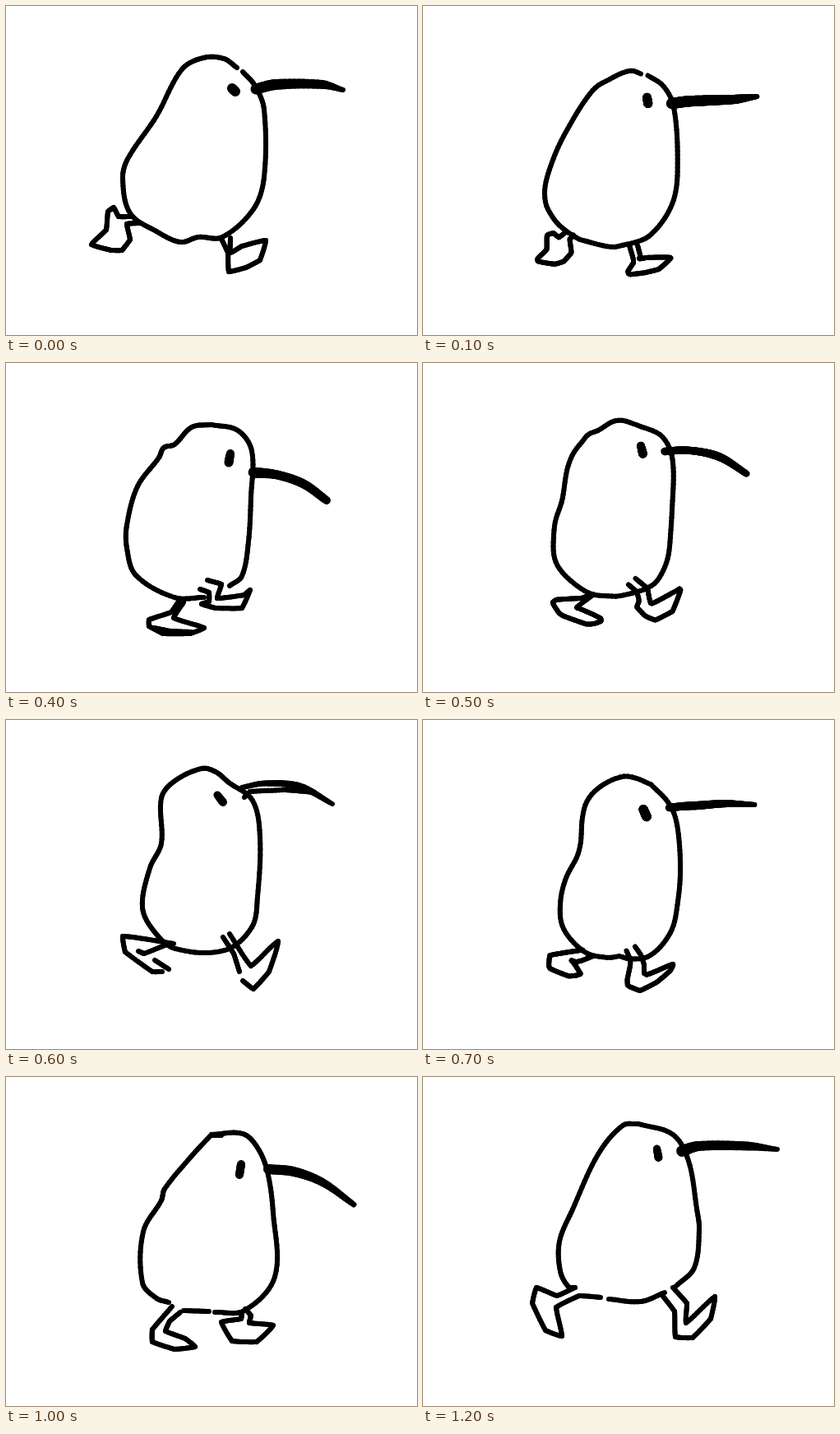
Write an HTML page with a canvas that moves like this. It is 500 px wide and 400 px high and loops after 1300 ms.

```html
<!DOCTYPE html>
<html>
<head>
<meta charset="utf-8">
<title>Running bird</title>
<style>
html, body { margin: 0; overflow: hidden; background: #fff; }
canvas { display: block; }
</style>
</head>
<body>
<canvas id="stage" width="500" height="400"></canvas>
<script>
const ctx = document.getElementById('stage').getContext('2d');
const STEP = 100, LOOP = 1300, PEN = 6;
const CURVE = { body: 1, beak: 1, eye: 1, a: 0.4, b: 0.4, mark: 0.4 };

// Key points "x,y" or "x,y,width"; a slash lifts the pen.
// Legs a and b swap sides every stride.
const poses = [
  {
    body: '288,80 303,97 314,126 314,208 301,247 263,281 234,281 212,287 183,274 151,252 142,210 148,186 183,134 214,77 240,63 265,64 281,75',
    a: '154,256 137,256 131,245 124,250 122,272 104,290 128,297 141,297 151,284 147,265 162,264',
    b: '262,283 270,300 271,323 292,318 309,309 316,285 287,292 273,300 273,282',
    eye: '275,100,12 279,104,12',
    beak: '304,101,13 328,95.5,13 385,95.5,11 410,102,6'
  },
  {
    body: '259,89 281,96 296,119 304,178 304,243 276,293 252,299 / 241,299 208,299 / 189,287 182,284 / 174,280 156,264 153,212 162,177 201,126 217,114 238,90 249,90',
    a: '193,294 194,308 178,306 179,320 170,330 193,331 210,316 210,300 204,293',
    b: '240,299 242,320 228,325 230,330 265,331 287,327 250,317 256,311 249,300',
    eye: '270,122,9 268.5,133,10',
    beak: '301,136,14 345,135,13 380,131,11 403,118,6'
  },
  {
    body: '250,75 282,82 299,107 298,163 295,217 287,259 272,271 / 241,285 205,285 158,258 147,225 147,197 160,150 186,115 192,103 205,99 226,78 250,75',
    a: '236,275 247,279 247,290 238,293 255,298 287,298 297,276 290,282 257,286 262,269 245,264',
    b: '210,290 201,303 174,312 174,320 191,329 224,329 241,322 204,310 216,291',
    eye: '273,110,10 271,121,11',
    beak: '301,133,13 330,136,11 362,147,11 390,167,10',
    mark: '180,322 200,326 225,327'
  },
  {
    body: '271,76 300,98 309,143 306,215 299,252 266,280 206,278 181,258 166,228 175,180 189,150 189,95 204,75 238,59 255,63 271,76',
    a: '264,264 277,284 284,306 / 288,317 301,327 320,306 331,269 298,299 272,260',
    b: '204,272 168,266 142,263 145,282 178,306 190,306 / 198,303 181,292 / 161,281 168,284 198,272',
    eye: '257,91,9 264,100,10',
    beak: '287,82,6 315,77,7 358,81,9 397,102,6',
    mark: '290,94 297,87 340,85 375,88'
  },
  {
    body: '284,81 297,101 310,130 317,185 315,222 303,265 277,297 252,297 244,291 / 231,297 200,293 173,268 167,233 171,209 193,165 200,132 213,99 245,79 284,81',
    a: '231,297 233,308 213,325 211,331 272,331 276,328 / 279,323 243,320 251,311 251,300 244,291',
    b: '185,287 160,319 188,314 197,303 208,305 218,301',
    eye: '279,126,13 280,135,13',
    beak: '312,131,13 345,131,13 378,121,9 410,104,6'
  },
  {
    body: '250,70 288,69 306,86 318,115 325,165 327,243 290,284 254,286 / 247,285 216,284 / 198,274 183,269 166,250 167,188 189,150 193,136 225,97 250,70',
    a: '202,279 178,307 178,322 205,331 230,328 218,318 194,309 199,297 212,286',
    b: '287,287 286,294 262,298 275,321 305,322 325,302 296,299 298,290 291,282',
    eye: '286,106,10 284,119,10',
    beak: '319,112,12 350,115,12 385,128,10 423,155,7',
    mark: '252,71 262,71'
  },
  {
    body: '262,57 304,70 323,102 333,160 336,185 330,232 308,254 / 294,262 265,273 226,270 / 185,256 177,255 167,236 166,200 182,161 213,94 243,59 262,57',
    a: '185,256 163,266 138,256 133,275 149,308 169,315 162,280 190,266 216,268',
    b: '290,264 306,285 307,316 328,317 350,294 355,267 320,299 321,275 304,256',
    eye: '284.5,87,9 286.5,98,10',
    beak: '315,90,14 335,84,12 395,84,11 431,88,6'
  }
].map(pose => Object.fromEntries(Object.entries(pose).map(([part, text]) =>
  [part, text.split(' / ').map(s => smooth(parse(s), CURVE[part]))])));

function parse(text) {
  return text.split(' ').map(p => {
    const [x, y, w = PEN] = p.split(',').map(Number);
    return [x, y, w];
  });
}

function mix(p, q, u) {
  return p.map((v, i) => v + (q[i] - v) * u);
}

function gap(p, q) {
  return Math.hypot(q[0] - p[0], q[1] - p[1]);
}

// Hermite curve through the points; curve 0 gives straight lines.
function smooth(pts, curve, n = 10) {
  const last = pts.length - 1;
  const tangent = i => {
    const p = pts[Math.max(i - 1, 0)], q = pts[Math.min(i + 1, last)];
    const d = gap(p, q) || 1;
    return [(q[0] - p[0]) / d, (q[1] - p[1]) / d, 0];
  };
  const out = [pts[0]];
  for (let i = 0; i < last; i++) {
    const p = pts[i], q = pts[i + 1], reach = curve * gap(p, q);
    const tp = tangent(i), tq = tangent(i + 1);
    for (let k = 1; k <= n; k++) {
      const u = k / n, v = 1 - u;
      out.push(mix(p, q, u * u * (3 - 2 * u)).map((c, j) => {
        const line = p[j] + (q[j] - p[j]) * u;
        const bend = c + reach * u * v * (v * tp[j] - u * tq[j]);
        return j === 2 ? line : line + (bend - line) * (curve < 1 ? curve : 1);
      }));
    }
  }
  return out;
}

// Spread n points evenly along the joined strokes.
function resample(strokes, n = 120) {
  const pts = strokes.flat(), at = [0];
  for (let i = 1; i < pts.length; i++) at.push(at[i - 1] + gap(pts[i - 1], pts[i]));
  let i = 1;
  return Array.from({ length: n }, (_, k) => {
    const d = at[at.length - 1] * k / (n - 1);
    while (i < pts.length - 1 && at[i] < d) i++;
    return mix(pts[i - 1], pts[i], (d - at[i - 1]) / (at[i] - at[i - 1] || 1));
  });
}

function blend(from, to) {
  return Object.fromEntries(['body', 'a', 'b', 'eye', 'beak'].map(part => {
    const end = resample(to[part]);
    return [part, [resample(from[part]).map((p, i) => mix(p, end[i], 0.5))]];
  }));
}

function draw(pose) {
  ctx.clearRect(0, 0, 500, 400);
  ctx.lineCap = 'round';
  for (const stroke of Object.values(pose).flat()) {
    for (let i = 1; i < stroke.length; i++) {
      const [x, y, w] = stroke[i];
      ctx.lineWidth = w;
      ctx.beginPath();
      ctx.moveTo(stroke[i - 1][0], stroke[i - 1][1]);
      ctx.lineTo(x, y);
      ctx.stroke();
    }
  }
}

// Key poses alternate with the poses halfway between them.
const steps = Array.from({ length: LOOP / STEP }, (_, k) =>
  k % 2 ? blend(poses[k >> 1], poses[(k >> 1) + 1]) : poses[k >> 1]);

const start = performance.now();
function tick() {
  draw(steps[Math.floor((performance.now() - start) % LOOP / STEP)]);
  requestAnimationFrame(tick);
}
tick();
</script>
</body>
</html>
```
